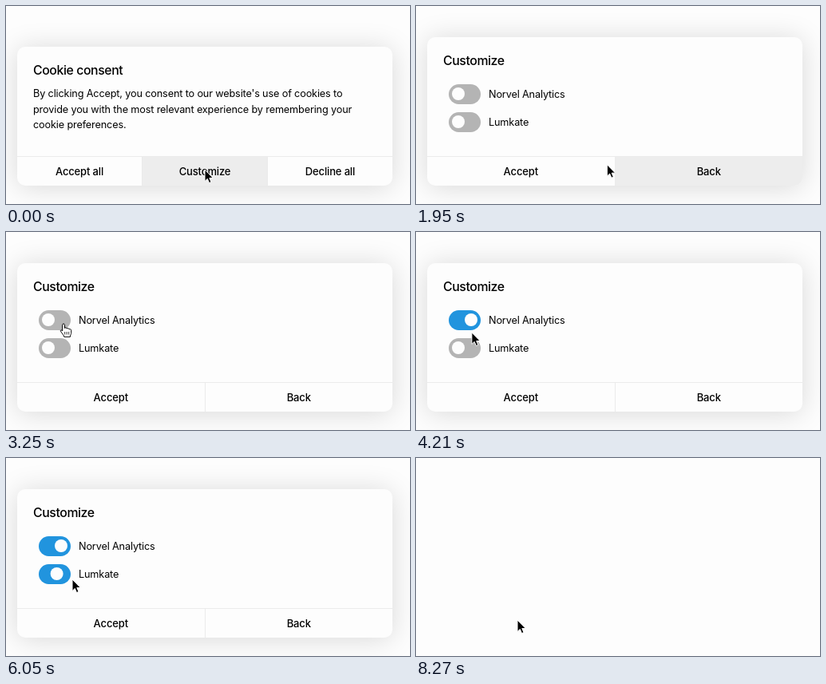
An HTML page for the animation above (8.29 s loop, 506x248 px).

```html
<!DOCTYPE html>
<html lang="en">
<meta charset="utf-8">
<title>Cookie consent</title>
<style>
html, body { margin: 0; width: 100%; height: 100%; overflow: hidden; background: #fdfdfd; }
body { position: relative; font: 12.7px/19.5px Inter, "Open Sans", sans-serif; letter-spacing: -.012em; color: #000; }
#card { position: absolute; left: 14px; bottom: calc(100% - 225px); width: 470px; border-radius: 10px;
  background: #fdfdfd; box-shadow: 0 2px 34px rgba(0, 0, 0, .15); overflow: hidden; }
h1 { position: absolute; left: 20px; top: 18px; margin: 0; font: 500 15.8px/24px Inter, "Open Sans", sans-serif; letter-spacing: -.025em; }
p { position: absolute; left: 20px; top: 49px; margin: 0; white-space: nowrap; }
.row { position: absolute; left: 27px; height: 25px; line-height: 25px; padding-left: 50px; white-space: nowrap; }
.row i { position: absolute; left: 0; top: 0; width: 40px; height: 25px; border-radius: 13px; }
.row b { position: absolute; left: 4px; top: 4px; width: 16px; height: 16px; border-radius: 50%; background: #fdfdfd; }
.bar { position: absolute; left: 0; right: 0; bottom: 0; height: 36px; border-top: 1px solid #ebebeb; display: flex; }
.bar span { flex: 1 1 0; text-align: center; font-size: 13px; font-weight: 500; line-height: 37px; }
.bar span + span { border-left: 1px solid #ebebeb; }
svg { position: absolute; left: 0; top: 0; overflow: visible; }
</style>
<div id="card">
  <div id="intro">
    <h1>Cookie consent</h1>
    <p>By clicking Accept, you consent to our website's use of cookies to<br>provide you with the most relevant experience by remembering your<br>cookie preferences.</p>
    <div class="bar"><span>Accept all</span><span id="customize">Customize</span><span>Decline all</span></div>
  </div>
  <div id="options">
    <h1>Customize</h1>
    <div class="row" style="top:59px"><i><b></b></i>Norvel Analytics</div>
    <div class="row" style="top:94px"><i><b></b></i>Lumkate</div>
    <div class="bar"><span id="accept">Accept</span><span id="back">Back</span></div>
  </div>
</div>
<svg width="20" height="20" stroke-linejoin="round">
  <path id="arrow" d="M0 0V14.5L3.3 11.4 5.5 16.6 8 15.5 5.8 10.5H10.3Z" fill="#000" stroke="#fff"/>
  <g id="hand" stroke="#000">
    <path d="M-1.3 9V1.4C-1.3 -.5 1.4 -.5 1.5 1.4V5.4C2 4.5 4 4.6 4.2 6 5 5.2 6.8 5.5 7 6.8 8 6.2 9.7 6.8 9.7 8.3V11.5C9.7 13 8.4 14 8.4 16.3H.8C.6 14.3 -1.8 12.4 -3.5 9.3 -4.2 7.8 -2.6 7.1 -1.3 9Z" fill="#fff"/>
    <path d="M1.7 10V13.5M4.2 10V13.5M6.7 10V13.5" fill="none" stroke-width=".8"/>
  </g>
</svg>
<script>
const LOOP = 8290, OPEN = 500, CLOSE = 7750;
const $ = id => document.getElementById(id);
const card = $('card'), cursor = document.querySelector('svg');
const rows = [...document.querySelectorAll('.row i')];
const toggledAt = [3450, 5880];
// time, x, y of the pointer
const path = [[0, 249, 205], [150, 250, 204], [1820, 250, 204], [2700, 72, 115], [3950, 72, 115],
  [4600, 66, 146], [5910, 66, 146], [6050, 83, 152], [6200, 83, 152], [7050, 126, 199],
  [7700, 126, 199], [8200, 127, 203], [LOOP, 127, 203]];
const handTimes = [[100, 1850], [2550, 4150], [4350, 5960], [6800, CLOSE + 150]];

const ramp = (t, start, length) => {
  const u = Math.min(1, Math.max(0, (t - start) / length));
  return u * u * (3 - 2 * u);
};
const mix = (a, b, u) => a + (b - a) * u;
const within = (t, a, b) => t >= a && t < b;
const show = (el, on) => el.style.display = on ? '' : 'none';
const hover = (id, on) => $(id).style.background = on ? '#ededed' : '';

function draw(now) {
  const t = now % LOOP;
  const open = t >= OPEN;
  card.style.height = mix(174, 186, ramp(t, OPEN, 250)) + 'px';
  card.style.opacity = 1 - ramp(t, CLOSE, 300);
  show($('intro'), !open);
  show($('options'), open);
  hover('customize', !open);
  hover('back', within(t, OPEN, 1990));
  hover('accept', within(t, 1990, 2090) || t > 6850);

  rows.forEach((row, i) => {
    const u = ramp(t, toggledAt[i], 280);
    const tint = ramp(t, toggledAt[i], 150);
    row.style.background = `rgb(${mix(180, 33, tint)},${mix(180, 148, tint)},${mix(180, 222, tint)})`;
    row.firstChild.style.transform = `translateX(${16 * u}px)`;
  });

  const k = path.findIndex(p => p[0] > t);
  const [t0, x0, y0] = path[k - 1], [t1, x1, y1] = path[k];
  const u = ramp(t, t0, t1 - t0);
  cursor.style.transform = `translate(${mix(x0, x1, u)}px,${mix(y0, y1, u)}px)`;
  const hand = handTimes.some(([a, b]) => within(t, a, b));
  show($('hand'), hand);
  show($('arrow'), !hand);
}

const start = performance.now();
(function tick() {
  draw(performance.now() - start);
  requestAnimationFrame(tick);
})();
</script>
</html>
```
